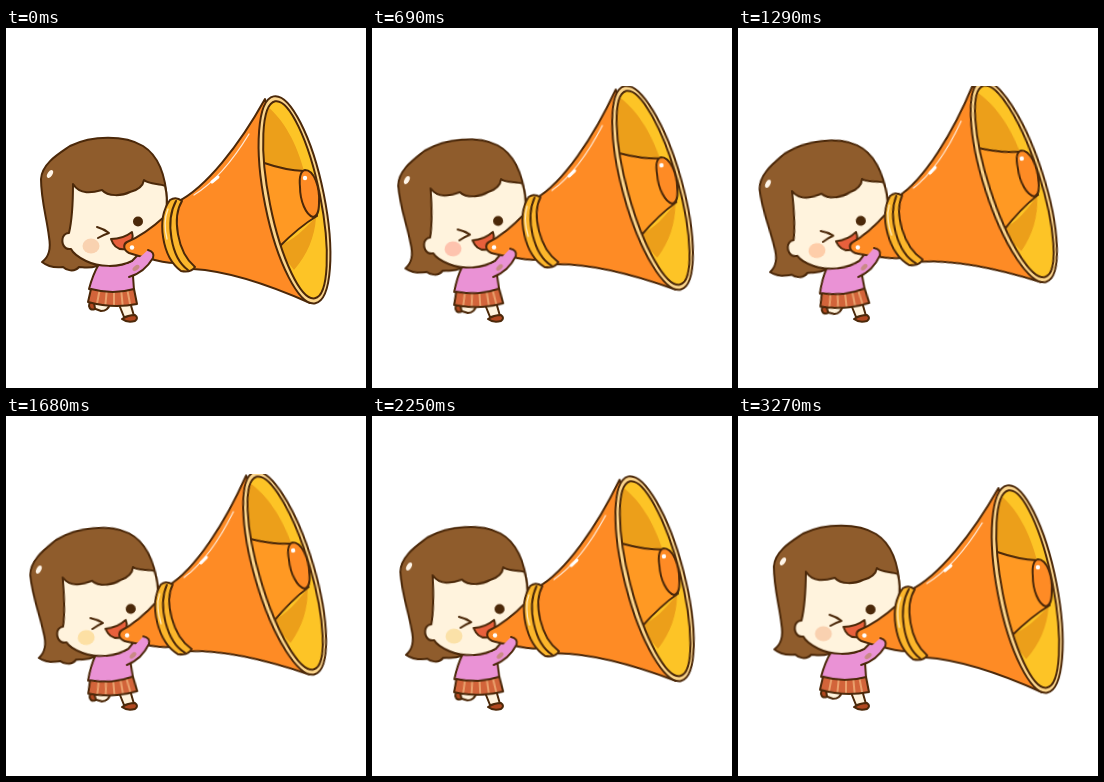
Animation, 360 px wide and 360 px high, one loop 3300 ms. Source, as an HTML page:

```html
<!DOCTYPE html>
<html lang="en">
<head>
<meta charset="utf-8">
<title>Megaphone girl</title>
<style>
  html, body { margin: 0; width: 100%; height: 100%; overflow: hidden; background: #fff; }
  svg { display: block; width: 100vw; height: 100vh; }
  .line { stroke: #4b2809; stroke-width: 2; stroke-linejoin: round; stroke-linecap: round; fill: none; }
  .skin { fill: #fff3dd; }
  .hair { fill: #8f5c2c; }
  .pink { fill: #ea92d5; }
  .orange { fill: #fe8b25; }
  .inner { fill: #ff9923; }
  .gold { fill: #fcb62b; }
  .shade { fill: #ec9f1a; }
  .skirt { fill: #d2643a; }
  .shoe { fill: #b1481f; }
  .mouth { fill: #e8603c; }
  .rim { fill: #fcd68d; }
  .shine { stroke: #fff; stroke-linecap: round; fill: none; }

  /* Leans left quickly and returns slowly, in 30 ms steps. */
  #figure { transform-origin: 122px 273px; animation: lean 3300ms infinite; }
  @keyframes lean {
    0% { transform: rotate(0deg); animation-timing-function: step-end; }
    0.909% { transform: rotate(0deg); animation-timing-function: steps(37); }
    34.545% { transform: rotate(-7.1deg); animation-timing-function: steps(72); }
    100% { transform: rotate(0.53deg); }
  }

  #cheek { fill: #f9d2b0; animation: blush 3300ms linear infinite; }
  @keyframes blush {
    0%, 100% { fill: #f9d2b0; }
    12.7% { fill: #fccbae; }
    28.2% { fill: #ffbcae; }
    50.9% { fill: #fde0a4; }
    68.2% { fill: #fbe1a8; }
    82.7% { fill: #fcc8ae; }
  }
</style>
</head>
<body>
<svg viewBox="0 0 360 360">
  <defs>
    <clipPath id="stage"><rect y="58.5" width="360" height="302"/></clipPath>
    <ellipse id="opening" rx="25.4" ry="100.5" transform="translate(289 171.8) rotate(-11.4)"/>
    <clipPath id="openingClip"><use href="#opening"/></clipPath>
    <path id="skirt" d="M85 261 Q107 267 128 261 L131 276 Q107 281 82 274Z"/>
    <clipPath id="skirtClip"><use href="#skirt"/></clipPath>
  </defs>

  <!-- standing leg -->
  <path class="line skin" d="M112 274 L118 289 L128 288 L124 274Z"/>
  <path class="line shoe" d="M116 291 Q122 287 129 287 Q133 290 129 293 Q121 295 116 291Z"/>

  <g clip-path="url(#stage)">
    <g id="figure">
      <!-- raised leg -->
      <path class="line skin" d="M104 276 Q102 283 95 283 L87 280 L87 273Z"/>
      <path class="line shoe" d="M88 274 Q83 273 83 278 Q84 283 89 281Z"/>

      <!-- hair -->
      <path class="line hair" d="M35 151 C36 135 54 125 64 118 C86 107 119 107 137 118 C153 128 160 149 161 174
        L150 205 L91 238 C82 241 77 239 73 239 C68 245 60 242 57 239 C49 240 41 238 36 234
        C43 229 45 220 43 209 C41 191 35 172 35 151Z"/>

      <!-- body -->
      <path class="line pink" d="M93 236 Q87 246 83 261 Q106 268 128 262 L127 248 L144 234 L134 222Z"/>
      <use class="skirt" href="#skirt"/>
      <path clip-path="url(#skirtClip)" stroke="#eaa06c" stroke-width="2"
        d="M94 260 L90 281 M101 260 L99 281 M108 260 L108 281 M115 260 L117 281 M121 260 L125 281"/>
      <use class="line" href="#skirt"/>

      <!-- face -->
      <path class="line skin" d="M67 156 C74 167 86 165 96 162 C102 169 116 168 124 164 C132 162 137 158 138 152
        C144 157 153 155 159 158 C163 174 160 193 153 205 L126 233 C113 240 92 239 80 233
        C72 229 67 225 65 221 C58 222 55 215 57 209 C59 205 62 205 63 205 C66 192 67 178 67 156Z"/>
      <ellipse id="cheek" cx="85" cy="218" rx="8.5" ry="7.5"/>
      <path class="line" d="M91 199 Q98 201 103 205 Q97 207 92 210"/>
      <circle cx="132" cy="193.5" r="5" fill="#4b2809"/>
      <path class="line mouth" d="M105 211 Q117 211 126 204 Q129 213 120 221 Q109 223 105 211Z"/>
      <ellipse cx="44" cy="146" rx="2.4" ry="4.3" fill="#fff5e8" transform="rotate(32 44 146)"/>

      <!-- mouthpiece and arm -->
      <path class="line orange" d="M121 214 C133 209 147 199 158 189 L170 235 C157 235 148 232 142 230
        C135 229 129 227 123 225 C117 222 117 216 121 214Z"/>
      <circle cx="126" cy="219.5" r="2.2" fill="#fff"/>
      <path class="pink" d="M119 237 C129 235 136 227 142 222 Q149 224 147 230 C141 240 134 246 123 249Z"/>
      <path class="line" d="M142 222 Q149 224 147 230 C141 240 134 246 123 249"/>
      <ellipse cx="130" cy="240" rx="4" ry="2.3" fill="#c98a85" transform="rotate(-38 130 240)"/>

      <!-- cone -->
      <path class="line orange" d="M171 174 C200 160 234 116 259 71 L304 275 C268 259 222 243 187 241
        C170 225 162 190 171 174Z"/>
      <path class="shine" stroke-width="1.3" opacity=".8" d="M188 167 C209 154 229 129 243 106"/>
      <path class="shine" stroke-width="3" d="M206 154 L212 149"/>

      <!-- collar -->
      <path class="line gold" d="M164 172 Q170 168 176 173 C166 189 171 224 189 239 Q185 245 175 243
        C156 229 150 191 164 172Z"/>
      <path class="line" d="M170 173 C159 193 165 230 182 242"/>
      <path class="shine" stroke-width="1.3" opacity=".7" d="M162 181 C158 191 159 203 161 211"/>

      <!-- bell -->
      <ellipse class="line rim" rx="29.8" ry="105.5" transform="translate(288.5 171.8) rotate(-11.4)"/>
      <g clip-path="url(#openingClip)">
        <rect x="240" y="60" width="90" height="222" fill="#fdc426"/>
        <path class="shade" d="M250 60 L261 78 C278 92 291 116 298 143 L250 142Z"/>
        <path class="shade" d="M270 219 C288 213 299 200 310 189 C309 209 301 227 288 242Z"/>
        <path class="line inner" d="M245 131 C259 134 271 142 298 143 L311 188 C296 197 286 206 273 219 L245 206Z"/>
        <path class="line orange" d="M299 142 C308 142 314 159 313 175 C313 185 310 189 307 189
          C300 187 294 173 294 159 C293 149 295 143 299 142Z"/>
        <circle cx="299" cy="150" r="2.2" fill="#fff"/>
      </g>
      <use class="line" href="#opening"/>
    </g>
  </g>
</svg>
</body>
</html>
```
